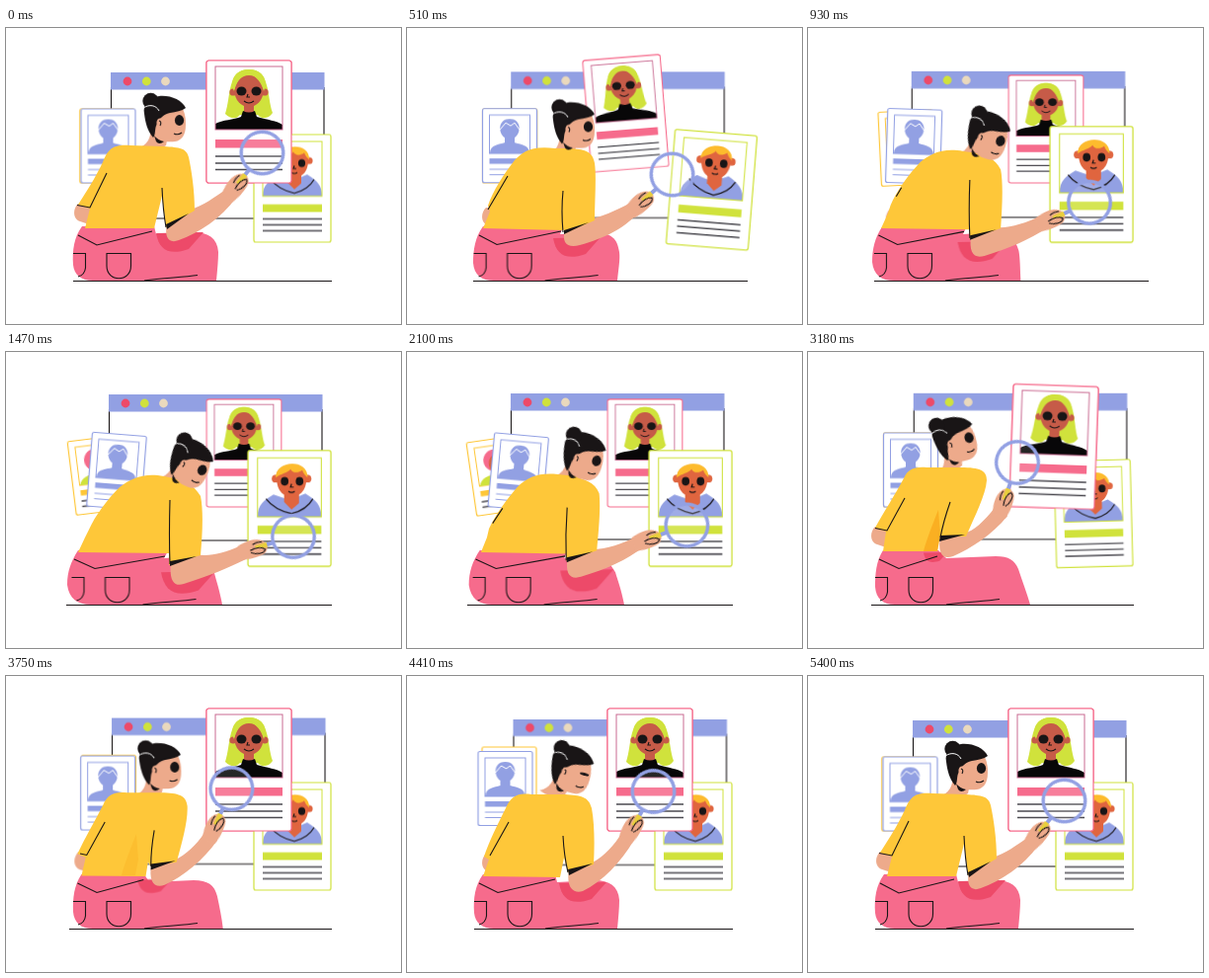
Animation, 400 px wide and 300 px high, one loop 5430 ms. Source, as an HTML page:

```html
<!DOCTYPE html>
<html lang="en">
<head>
<meta charset="utf-8">
<title>Comparing profiles</title>
<style>
html, body { margin: 0; width: 100%; height: 100%; overflow: hidden; background: #fff; }
svg { display: block; width: 400px; height: 300px; }
:root {
  --blue: #92a0e3; --pink: #f66b8c; --lime: #d0e23c; --yellow: #fec739;
  --skin: #edaa8b; --ink: #191516; --red: #ed4a69;
  --in: cubic-bezier(.42, 0, .8, .7); --out: cubic-bezier(.2, .3, .58, 1);
}
.line { fill: none; stroke: var(--ink); stroke-width: 1.1; }
.rows { fill: none; stroke: #4b4a50; stroke-width: 1.4; }
.move { animation: 5430ms ease-in-out infinite; }

#window { animation-name: window; }
@keyframes window {
  0%, 100% { transform: none; }
  9.392% { transform: translate(-.8px, -.6px); }
  27.072% { transform: translate(-2px, -2px); }
  48.066% { transform: translate(-.5px, -3.7px); }
  58.564% { transform: translate(.7px, -3.2px); }
  81.215% { transform: translate(1.5px, -1.5px); }
}
#back { animation-name: back; }
@keyframes back {
  0%, 100% { transform: translate(102.3px, 119.5px); }
  9.392% { transform: translate(104.2px, 119.5px); }
  27.072% { transform: translate(94px, 124.8px) rotate(-7deg); }
  34.07% { transform: translate(91px, 126px) rotate(-9deg); }
  48.066% { transform: translate(98px, 122.7px) rotate(-5.5deg); }
  58.564%, 64% { transform: translate(104px, 119.5px); }
  81.215%, 88% { transform: translate(103.5px, 109.5px); }
}
#blank { animation-name: blank; }
@keyframes blank {
  0%, 100% { transform: translate(103.5px, 119.5px); }
  9.392% { transform: translate(104px, 119.2px); }
  27.072% { transform: translate(112px, 120.8px) rotate(4.5deg); }
  34.07% { transform: translate(114px, 122px) rotate(6deg); }
  48.066% { transform: translate(108.5px, 120.5px) rotate(2.2deg); }
  58.564%, 64% { transform: translate(104px, 119.5px); }
  81.215%, 88% { transform: translate(99.5px, 114px); }
}
.pink { animation-name: pink; }
@keyframes pink {
  0%, 62.62%, 100% { transform: translate(246px, 95px); }
  6.446% { transform: translate(213px, 79px) rotate(-7deg) scale(.93); animation-timing-function: var(--in); }
  9.392% { transform: translate(221.5px, 86.5px) rotate(-4.6deg) scale(.914); animation-timing-function: var(--out); }
  15.65%, 39.23% { transform: translate(241px, 102.5px) scale(.88); animation-timing-function: var(--in); }
  48.066% { transform: translate(226.5px, 90px) rotate(-2deg) scale(.907); animation-timing-function: var(--out); }
  52.76% { transform: translate(214px, 77px) rotate(-5deg) scale(.95); }
  58.564% { transform: translate(249px, 96px) rotate(2deg); }
}
#green { animation-name: green; }
@keyframes green {
  0%, 62.62%, 100% { transform: translate(290px, 162.5px); }
  6.446% { transform: translate(314px, 166px) rotate(6deg) scale(1.05); animation-timing-function: var(--in); }
  9.392% { transform: translate(308.5px, 164px) rotate(4.6deg) scale(1.067); animation-timing-function: var(--out); }
  15.65%, 39.23% { transform: translate(287px, 158.5px) scale(1.077); animation-timing-function: var(--in); }
  48.066% { transform: translate(304.3px, 166px) rotate(1.3deg) scale(1.06); animation-timing-function: var(--out); }
  52.76% { transform: translate(314px, 167px) rotate(5deg) scale(1.04); }
  58.564% { transform: translate(289px, 163.8px) rotate(-1.5deg) scale(.99); }
}
/* The pink card lies over the green one except while the green is examined. */
#front { animation-name: front; animation-timing-function: step-end; }
@keyframes front {
  0%, 52.76%, 100% { opacity: 1; }
  6.446% { opacity: 0; }
}
.head { animation-name: head; }
@keyframes head {
  0%, 100% { transform: translate(160px, 95px); animation-timing-function: var(--in); }
  9.392% { transform: translate(168px, 101.5px); animation-timing-function: var(--out); }
  27.072%, 35% { transform: translate(184px, 114.5px) rotate(25deg); animation-timing-function: var(--in); }
  48.066% { transform: translate(168.6px, 100.4px) rotate(4deg); animation-timing-function: var(--out); }
  58.564% { transform: translate(148.4px, 92px) rotate(-14deg); }
  81.215% { transform: translate(164.3px, 97px) rotate(15deg); }
}
#eye { animation-name: blink; transform-box: fill-box; transform-origin: center; }
@keyframes blink {
  0%, 78.5%, 84%, 100% { transform: none; }
  80%, 82.5% { transform: scaleY(.28); }
}
#torso { animation-name: torso; fill: var(--yellow); }
@keyframes torso {
  0%, 100% { d: path("M126 119C108 118 104 122 98 136C90 153 80 168 73 179L85 183L80 203L150 203L158 170L162 202L191 185C191 165 188 145 185 131C183 122 176 121 160 120Z"); animation-timing-function: var(--in); }
  9.392% { d: path("M150 122C125 119 117 126 109 134C98 148 87 165 82 180L84 186L77 203L158 205L159 204L160 208L190 195C190 175 192 150 190 137C188 124 178 123 165 122Z"); animation-timing-function: var(--out); }
  27.072%, 35% { d: path("M160 126C140 122 127 128 115 137C103 149 90 166 84 180L80 188L73 203L164 204L165 204L165 216L197 206C199 185 200 160 197 146C190 134 180 131 170 128Z"); animation-timing-function: var(--in); }
  48.066% { d: path("M145 122C128 122 117 125 109 136C100 148 89 164 82 178L82 188L77 203L154 205L156 204L157 207L187 196C189 175 192 155 192 140C190 130 180 127 165 123Z"); animation-timing-function: var(--out); }
  58.564% { d: path("M120 117C107 116 101 119 97 128C88 145 78 160 68 178L79 182L76 202L131 202L132 192L133 187L160 187C169 166 180 145 181 130C181 120 174 117 155 117Z"); }
  81.215% { d: path("M126 120C112 118 105 122 100 134C92 150 83 168 78 183L83 186L77 203L155 204L159 184L163 199L189 191C190 172 190 150 187 134C184 122 176 121 160 120Z"); }
}
#shade { animation-name: shade; }
@keyframes shade {
  0%, 48.066%, 75%, 100% { opacity: 0; }
  56%, 61% { opacity: 1; }
}
#fold { animation-name: fold; }
@keyframes fold {
  0%, 100% { d: path("M72 179.5L85 182L102 147M158 162Q159 185 162 202"); animation-timing-function: var(--in); }
  9.392% { d: path("M82 184L82 184L102 150M158 165Q156 185 158 207"); animation-timing-function: var(--out); }
  27.072%, 35% { d: path("M92 166L92 166L92 166M166 150Q165 185 166 215"); animation-timing-function: var(--in); }
  48.066% { d: path("M81 182L81 182L102 150M158 166Q155 185 156 207"); animation-timing-function: var(--out); }
  58.564% { d: path("M68 178.5L80 181L98 148M144 152Q137 172 134 188"); }
  81.215% { d: path("M84 182L84 182L103 148M158 162Q159 182 163 199"); }
}
#cuff { animation-name: cuff; }
@keyframes cuff {
  0%, 100% { d: path("M162 199L185 188L163 204Z"); animation-timing-function: var(--in); }
  9.392% { d: path("M159 205L184 197L159 209Z"); animation-timing-function: var(--out); }
  27.072%, 35% { d: path("M166 212L193 207L166 217Z"); animation-timing-function: var(--in); }
  48.066% { d: path("M157 204L183 197L157 209Z"); animation-timing-function: var(--out); }
  58.564% { d: path("M134 186L159 185L133 192Z"); }
  81.215% { d: path("M163 196L188 190L164 202Z"); }
}
#arm { animation-name: arm; fill: var(--skin); }
@keyframes arm {
  0%, 100% { d: path("M163 199C160 212 165 219 175 215C195 208 218 193 233 172L224 163C210 172 200 180 187 184Z"); animation-timing-function: var(--in); }
  9.392% { d: path("M160 204C156 219 163 223 175 220C200 213 222 203 239 182L234 173C218 182 202 190 185 194Z"); animation-timing-function: var(--out); }
  27.072%, 35% { d: path("M167 212C165 232 170 238 180 235C205 227 225 219 243 210L236 197C220 204 205 208 192 205Z"); animation-timing-function: var(--in); }
  48.066% { d: path("M158 204C154 219 161 223 172 220C198 213 220 202 236 184L231 175C215 184 200 191 183 195Z"); animation-timing-function: var(--out); }
  58.564% { d: path("M134 186C131 204 136 211 147 207C165 199 187 185 202 166L189 158C178 172 168 181 158 184Z"); }
  81.215% { d: path("M164 196C161 214 168 221 178 218C198 208 216 190 230 166L218 158C210 172 200 182 188 189Z"); }
}
#lens { animation-name: lens; }
@keyframes lens {
  0%, 100% { transform: translate(259.5px, 126.5px) rotate(38deg); animation-timing-function: var(--in); }
  9.392% { transform: translate(268.5px, 148.5px) rotate(48deg); animation-timing-function: var(--out); }
  27.072%, 35% { transform: translate(291px, 187px) rotate(73deg); animation-timing-function: var(--in); }
  48.066% { transform: translate(275px, 163px) rotate(67deg); animation-timing-function: var(--out); }
  58.564% { transform: translate(212px, 112px) rotate(19deg); }
  81.215% { transform: translate(249.5px, 117px) rotate(30deg); }
}
#elbow { animation-name: elbow; fill: var(--skin); }
@keyframes elbow {
  0%, 100% { transform: none; }
  9.392% { transform: translate(7px, 4px); }
  27.072%, 35% { transform: translate(14px, 8px); }
  48.066% { transform: translate(10px, 5px); }
  58.564% { transform: translate(-5px, -1px); }
  81.215% { transform: translate(7px, 2px); }
}
#legs { animation-name: legs; fill: var(--pink); }
@keyframes legs {
  0%, 81.215%, 100% { d: path("M77 201C69 212 67 225 68 240C69 250 76 256 88 256L213 256C214 245 215 235 215 227C214 213 205 207 190 207L152 209L150 201Z"); }
  9.392% { d: path("M77 201C69 212 67 225 67 238C68 250 75 256 88 256L213 256C214 245 216 235 215 227C213 213 207 208 190 207L155 209L158 202Z"); }
  27.072%, 35% { d: path("M73 201C66 212 62 222 62 236C64 250 72 256 86 256L219 256C216 240 213 232 211 224C206 215 200 210 190 207L160 209L164 202Z"); }
  48.066% { d: path("M77 201C69 212 66 225 66 238C68 250 75 256 86 256L225 256C222 245 216 230 211 220C207 211 202 207 190 207L155 209L154 202Z"); }
  58.564% { d: path("M76 201C69 212 68 225 68 238C69 250 76 256 88 256L225 256C222 245 217 232 213 220C209 211 204 207 190 207L140 209L132 201Z"); }
}
#shadow { animation-name: shadow; fill: var(--red); }
@keyframes shadow {
  0%, 100% { transform: translate(152px, 207px); }
  9.392% { transform: translate(148px, 212px); }
  27.072%, 35% { transform: translate(157px, 222px) scale(1.15); }
  48.066% { transform: translate(146px, 212px); }
  58.564% { transform: translate(117px, 203px) scale(.5); }
  81.215% { transform: translate(154px, 209px); }
}
#seam { animation-name: seam; }
@keyframes seam {
  0%, 100% { d: path("M73 210L92 220L148 206"); }
  9.392% { d: path("M73 210L91 219.5L156 206"); }
  27.072%, 35% { d: path("M69 210L90 219.5L161 207"); }
  48.066% { d: path("M72 210L91 219.5L155 206"); }
  58.564% { d: path("M72 210L92 219.5L131 207"); }
  81.215% { d: path("M73 210L92 219.5L150 206"); }
}
#pockets { animation-name: pockets; }
@keyframes pockets {
  0%, 58.564%, 100% { transform: none; }
  27.072%, 35% { transform: translateX(-1.5px); }
}
#ground { animation-name: ground; animation-timing-function: step-end; }
@keyframes ground {
  0%, 73%, 100% { d: path("M68 256.5H330"); }
  6.446% { d: path("M67 256.5H345"); }
  18% { d: path("M61 256.5H330"); }
  42% { d: path("M65 256.5H345"); }
  53% { d: path("M64 256.5H330"); }
}
</style>
</head>
<body>
<svg viewBox="0 0 400 300">
  <defs>
    <g id="profile">
      <rect x="-43" y="-62" width="86" height="124" rx="2.5" fill="#fff" stroke="var(--pink)" stroke-width="1.2"/>
      <path d="M0-53C-22-53-18-26-24-8C-18-2-12-3-9-7H9C13-2 20-3 24-9C18-26 22-53 0-53Z" fill="var(--lime)"/>
      <g fill="#c65b48">
        <path d="M-5-18H5V0H-5Z"/>
        <circle cx="-16" cy="-30" r="3.6"/><circle cx="16" cy="-30" r="3.6"/>
        <ellipse cy="-31" rx="14.5" ry="16"/>
      </g>
      <path d="M-1-50C-9-46-13-39-15-31C-20-42-14-53 0-53S20-42 15-31C13-39 8-46-1-50Z" fill="var(--lime)"/>
      <path d="M-34 8V2C-27-2-15-2-8-5L-6-11Q0-8 6-11L8-5C18-2 29-1 34 3V8Z" fill="#080708"/>
      <ellipse cx="-7.5" cy="-31" rx="5" ry="4.5" fill="var(--ink)"/>
      <ellipse cx="7.5" cy="-31" rx="5" ry="4.5" fill="var(--ink)"/>
      <path class="line" d="M-5-21Q0-17 5-21M-1-28L-2-25H1"/>
      <rect x="-34" y="-56" width="68" height="64" fill="none" stroke="#c96a91"/>
      <path d="M-34 18H34V26.5H-34Z" fill="var(--pink)"/>
      <path class="rows" d="M-34 35H34M-34 42H34M-34 48.5H34"/>
    </g>
  </defs>

  <g id="window" class="move">
    <path class="line" d="M106.5 60V193H322V60"/>
    <path d="M106 45H322.5V62.5H106Z" fill="var(--blue)"/>
    <circle cx="123" cy="54" r="4.4" fill="var(--red)"/>
    <circle cx="142.3" cy="54" r="4.4" fill="var(--lime)"/>
    <circle cx="161.5" cy="54" r="4.4" fill="#ead9bd"/>
  </g>

  <g id="back" class="move">
    <rect x="-27.5" y="-37.5" width="55" height="75" rx="2" fill="#fff" stroke="var(--yellow)" stroke-width="1.2"/>
    <rect x="-20.5" y="-31" width="41" height="39" fill="none" stroke="var(--yellow)"/>
    <path d="M-20 8C-18 0-10-2 0-2S18 0 20 8Z" fill="var(--lime)"/>
    <circle cx="-2" cy="-16" r="11" fill="var(--pink)"/>
    <ellipse cy="-12" rx="8" ry="10" fill="#d9633b"/>
    <path d="M-20.5 13H20.5V18.5H-20.5Z" fill="var(--yellow)"/>
    <path class="rows" d="M-20.5 24H20.5M-20.5 29.5H20.5"/>
  </g>

  <g id="blank" class="move" stroke="var(--blue)" fill="var(--blue)">
    <rect x="-27.5" y="-37.5" width="55" height="75" rx="2" fill="#fff" stroke-width="1.2"/>
    <rect x="-20.5" y="-31" width="41" height="39" fill="none"/>
    <path stroke="none" d="M-20 8C-20-1-11-1-5-3V-8C-12-13-12-27 0-27S12-13 5-8V-3C11-1 20-1 20 8Z"/>
    <path d="M-10-16L-4-23L1-20L5-23L10-16" fill="none" stroke="#fff"/>
    <path stroke="none" d="M-20.5 13H20.5V18.5H-20.5Z"/>
    <path d="M-20.5 24H20.5M-20.5 29.5H20.5" stroke-width="1.2"/>
  </g>

  <g class="pink move"><use href="#profile"/></g>

  <g id="green" class="move">
    <rect x="-39" y="-54.5" width="78" height="109" rx="2" fill="#fff" stroke="var(--lime)" stroke-width="1.2"/>
    <path d="M-30 8C-30-4-23-8-15-13L0-8L15-14C25-8 30-3 30 8Z" fill="var(--blue)"/>
    <g fill="#e0653f">
      <path d="M-5-14H9V-5L2 1L-5-6Z"/>
      <circle cx="-13" cy="-28" r="3.6"/><circle cx="17" cy="-28" r="3.6"/>
      <path d="M-12-32C-12-43 16-43 16-32C17-17 10-11 2-11S-13-17-12-32Z"/>
    </g>
    <path d="M-13-29C-13-46 18-47 17-29C15-31 13-33 12-36C8-33 3-33 1-37C-2-33-8-33-13-29Z" fill="#fdbb2d"/>
    <ellipse cx="-4.5" cy="-25.5" rx="3.6" ry="4" fill="var(--ink)"/>
    <ellipse cx="9.5" cy="-25.5" rx="3.6" ry="4" fill="var(--ink)"/>
    <path class="line" d="M-1-16Q2-14 5-16M2-23L1-20H4M-22-9C-15 0-7 3 2 5C10 3 18-2 22-9"/>
    <rect x="-30" y="-47.5" width="60" height="55.5" fill="none" stroke="var(--lime)"/>
    <path d="M-30 16.3H30V24H-30Z" fill="var(--lime)"/>
    <path class="rows" d="M-30 31H30M-30 37H30M-30 43H30"/>
  </g>

  <g id="front" class="move">
    <g class="pink move"><use href="#profile"/></g>
  </g>

  <path id="ground" class="line move"/>
  <path id="elbow" class="move" d="M73 178C67 184 68 194 75 196L84 199L86 180Z"/>
  <path id="legs" class="move"/>
  <path id="shadow" class="move" d="M0 1C3 18 13 24 33 17L48 0Z"/>
  <path id="seam" class="line move"/>
  <g id="pockets" class="line move">
    <path d="M102 228.5H126.5V241C126.5 258 102 258 102 241ZM68 228.5H80.5V243C80 248 77 251 73 252"/>
    <path d="M140 256C160 253 178 253 194 250.5"/>
  </g>

  <path class="head move" d="M-13 2L4 14L2 24Q-10 32-24 26C-17 22-13 18-13 2Z" fill="var(--skin)"/>
  <path id="arm" class="move"/>
  <path id="torso" class="move"/>
  <path id="shade" class="move" d="M132 160C126 175 120 190 117 202H131L134 186Z" fill="#faaf22"/>
  <path id="fold" class="line move"/>
  <path id="cuff" class="move" fill="var(--ink)"/>

  <g class="head move">
    <path d="M-8-10L16-17C21-12 22-4 22 3C22 13 18 19 11 20C3 21-5 20-10 12Z" fill="var(--skin)"/>
    <path d="M-10 14Q-6 19 0 20Q-5 24-8 20Z" fill="var(--ink)"/>
    <path d="M22-14C18-22 7-27-5-26C-15-25-22-18-20-8C-19 0-17 9-11 16C-8 13-10 6-7 2C-5-4 1-8 6-9C12-10 18-11 22-14Z" fill="var(--ink)"/>
    <circle cx="-13.5" cy="-21" r="8.2" fill="var(--ink)"/>
    <path d="M-21-14C-15-18-8-17-5-11" fill="none" stroke="#fff"/>
    <ellipse cx="-4" cy="1" rx="3.6" ry="4.6" fill="var(--skin)"/>
    <path class="line" d="M-5-1Q-2 0-4 4M10 12Q14 14 18 11"/>
    <ellipse id="eye" class="move" cx="15.5" cy="-1.5" rx="4.6" ry="5.4" fill="var(--ink)"/>
  </g>

  <g id="lens" class="move">
    <circle r="21.3" fill="#fff" fill-opacity=".12" stroke="var(--blue)" stroke-width="3.4"/>
    <path d="M0 22V32" stroke="var(--blue)" stroke-width="4"/>
    <path d="M-7 57C-10 46-10 37-5 31C-1 27 5 27 8 33C10 42 9 50 7 58Z" fill="var(--skin)"/>
    <path d="M0 28V40" stroke="#e9cf3d" stroke-width="5"/>
    <path d="M1 46C-1 40 1 33 4 31C8 33 7 41 3 46Z" fill="var(--skin)"/>
    <path class="line" d="M1 46C-1 40 1 33 4 31C8 33 7 41 3 46M-4 32Q-6 37-4 42"/>
  </g>
</svg>
</body>
</html>
```
